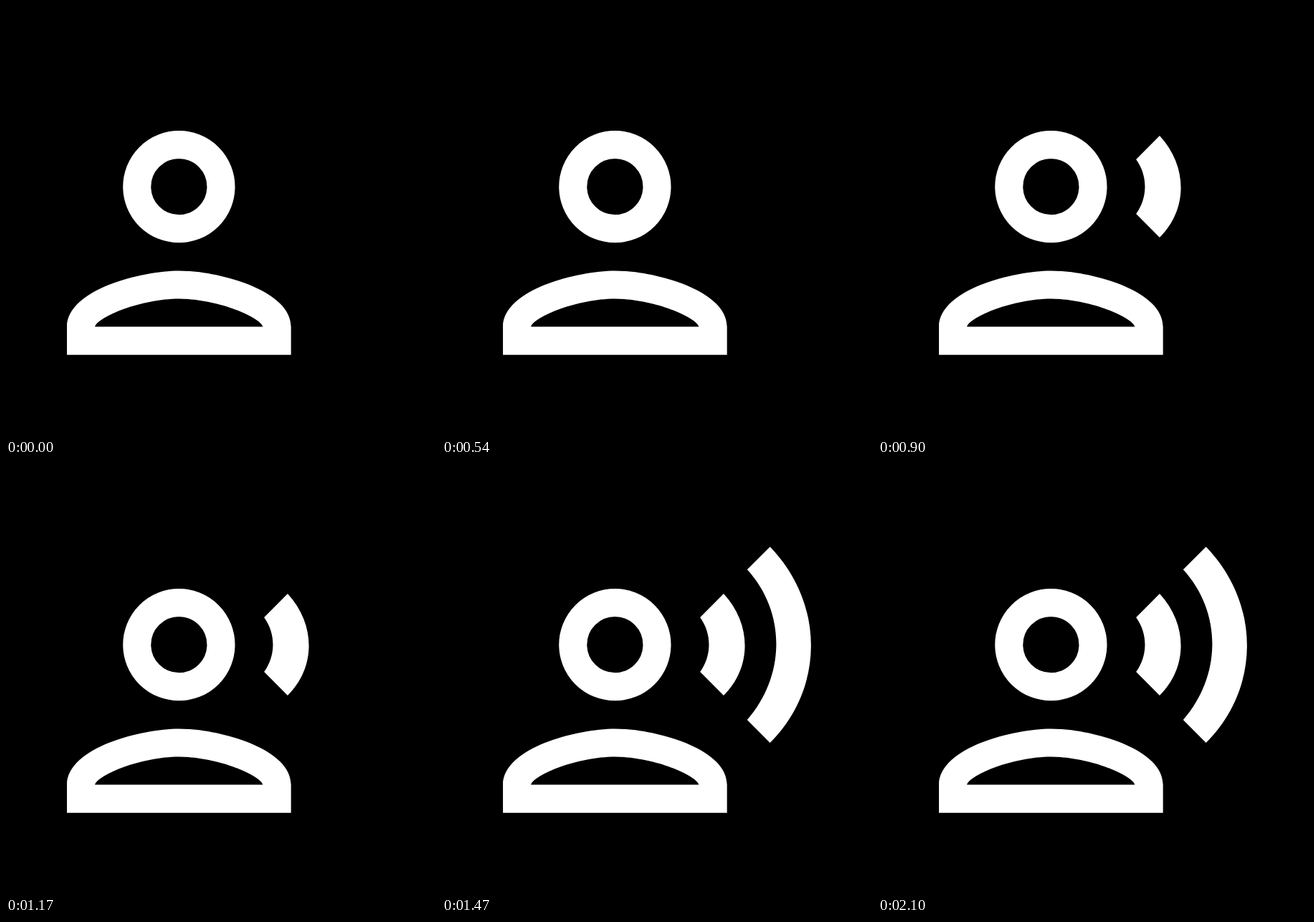
Animation, 600 px wide and 600 px high, one loop 2.13 s. Source, as an HTML page:

```html
<!DOCTYPE html>
<html lang="en">
<head>
<meta charset="utf-8">
<title>Speaking person</title>
<style>
  html, body { margin: 0; width: 100%; height: 100%; overflow: hidden; background: #000; }
  svg { display: block; width: 100vw; height: 100vh; }
  .wave { visibility: hidden; }
</style>
</head>
<body>
<svg viewBox="0 0 600 600">
  <g transform="translate(65.5 76.3) scale(19.54)" fill="#fff">
    <circle cx="9" cy="9" r="3" fill="none" stroke="#fff" stroke-width="2"/>
    <path fill-rule="evenodd" d="M9 15c-2.67 0-8 1.34-8 4v2h16v-2c0-2.66-5.33-4-8-4z
      M3 19c.22-.72 3.31-2 6-2 2.7 0 5.8 1.29 6 2z"/>
    <path class="wave" data-start="600" d="M16.76 5.36l-1.68 1.69c.84 1.18.84 2.71 0 3.89l1.68 1.69c2.02-2.02 2.02-5.07 0-7.27z"/>
    <path class="wave" data-start="1200" d="M20.07 2l-1.63 1.63c2.77 3.02 2.77 7.56 0 10.74L20.07 16c3.9-3.89 3.91-9.95 0-14z"/>
  </g>
</svg>
<script>
  const LOOP = 2130;
  const waves = document.querySelectorAll('.wave');
  const begin = performance.now();

  // Each wave switches on at its start time and stays until the loop ends.
  function draw(now) {
    const t = Math.max(0, now - begin) % LOOP;
    for (const wave of waves) {
      wave.style.visibility = t >= +wave.dataset.start ? 'visible' : 'hidden';
    }
    requestAnimationFrame(draw);
  }
  draw(begin);
</script>
</body>
</html>
```
